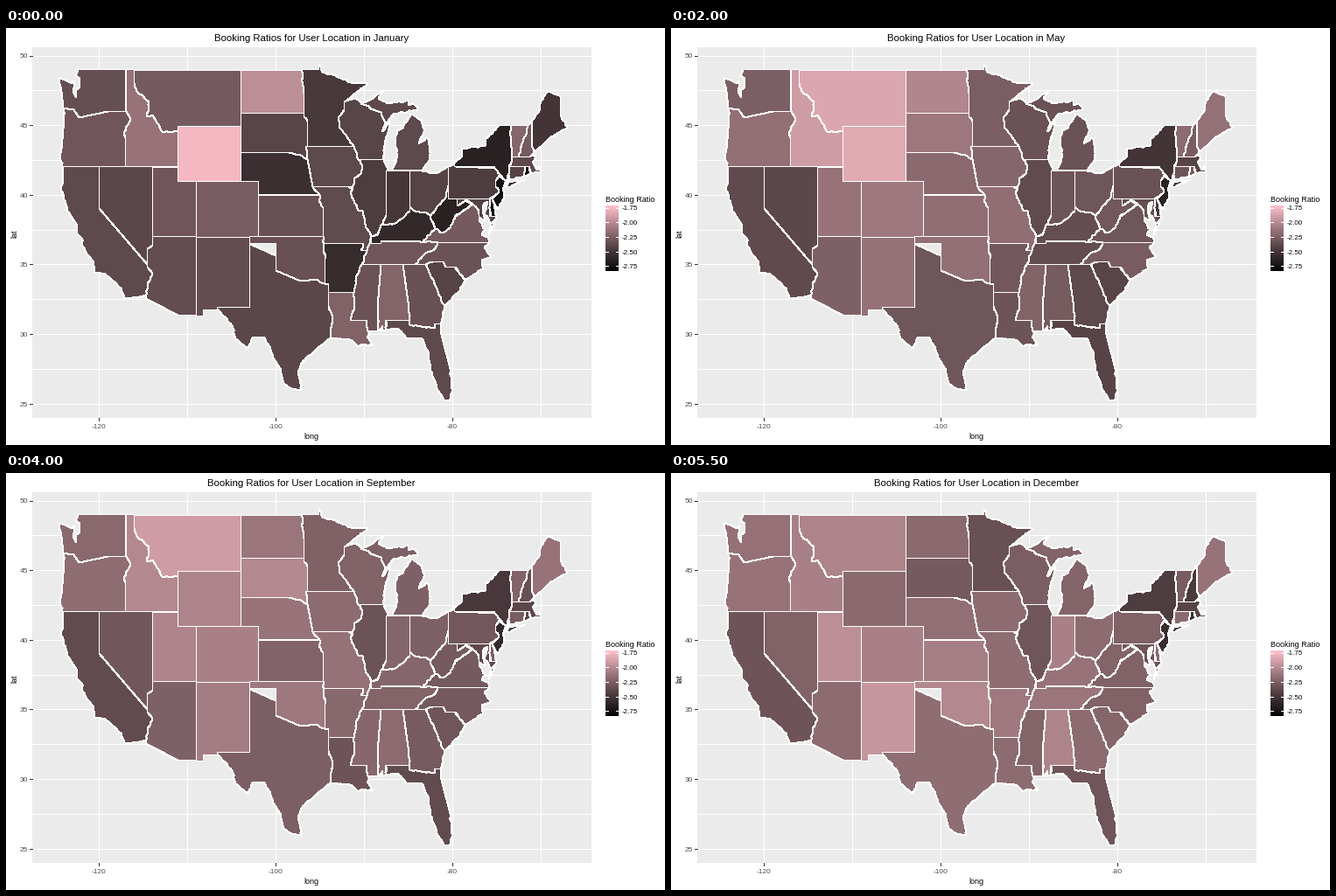
A matplotlib script for the animation above (6 s loop, 753 px wide and 477 px high).

```python
import math
import random

import matplotlib.pyplot as plt
import numpy as np
from matplotlib.animation import FuncAnimation
from matplotlib.patches import Polygon, Rectangle

WIDTH, HEIGHT = 753, 477
MONTHS = ["January", "February", "March", "April", "May", "June", "July",
          "August", "September", "October", "November", "December"]
# A state's shade runs through four seasons, at these month numbers.
SEASONS = [0, 3, 6.5, 10]

plt.rcParams["font.family"] = "Liberation Sans"
fig = plt.figure(figsize=(WIDTH / 72, HEIGHT / 72), dpi=72, facecolor="white")
ax = fig.add_axes([0, 0, 1, 1])
ax.axis("off")


def pink(t):
    """Black to pink, evenly spaced in CIE Lab."""
    light, a, b = 83.59 * t, 24.14 * t, 3.33 * t
    fy = (light + 16) / 116
    f = np.array([fy + a / 500, fy, fy - b / 200])
    xyz = np.where(f > 6 / 29, f ** 3, 3 * (6 / 29) ** 2 * (f - 4 / 29))
    xyz = xyz * [0.9505, 1, 1.089]
    rgb = np.array([[3.2406, -1.5372, -0.4986],
                    [-0.9689, 1.8758, 0.0415],
                    [0.0557, -0.2040, 1.0570]]) @ xyz
    rgb = np.clip(rgb, 0, 1)
    return np.where(rgb > 0.0031308, 1.055 * rgb ** (1 / 2.4) - 0.055, 12.92 * rgb)


def shade(month, seasons):
    t = np.interp(month, SEASONS, seasons) / 100
    return pink(t + 0.3 * t * (1 - t))


def wiggle(p, q):
    """Inner points of a ragged border; long or square borders stay straight."""
    dx, dy = q[0] - p[0], q[1] - p[1]
    length = math.hypot(dx, dy)
    if min(abs(dx), abs(dy)) < 1 or length > 30:
        return []
    n = max(1, int(length // 3))
    rng = random.Random(p[0] * 7919 + p[1] * 613 + q[0] * 31 + q[1])
    return [(p[0] + dx * k / n + rng.uniform(-0.8, 0.8),
             p[1] + dy * k / n + rng.uniform(-0.8, 0.8)) for k in range(1, n)]


def outline(flat):
    points = list(zip(flat[::2], flat[1::2]))
    path = []
    for p, q in zip(points, points[1:] + points[:1]):
        path += [p] + wiggle(p, q)
    return np.array(path) + 0.5


def box(x0, y0, x1, y1):
    return [x0, y0, x1, y0, x1, y1, x0, y1]


def line(x, y, color="white", width=1):
    ax.plot(x, y, color=color, lw=width, antialiased=False, zorder=1,
            solid_capstyle="butt")


def label(x, y, text, size, color="black", **kw):
    return ax.text(x, y, text, fontsize=size, color=color, **kw)


# Panel, grid and axes
ax.add_patch(Rectangle((30, 22), 639.5, 424, fc="#EBEBEB", lw=0, zorder=0))
for lon in range(-120, -60, 10):
    x = 308.5 + 10.1 * (lon + 100)
    line([x, x], [22, 446])
    if lon % 20 == 0:
        line([x, x], [446, 449], "#333333")
        label(x - 0.5, 458.5, str(lon), 8.2, "#4D4D4D", ha="center")
for step in range(11):
    y = 31.5 + 39.82 * step
    line([30, 669], [y, y])
    if step % 2 == 0:
        line([27, 30], [y, y], "#333333")
        label(25, y + 3, str(50 - step * 5 // 2), 8.4, "#4D4D4D", ha="right")
label(349, 470.5, "long", 9, ha="center")
label(10, 235, "lat", 9, rotation=90, ha="center", va="center")
title = label(349, 15, "", 11.4, ha="center")

# Legend
label(685, 199, "Booking Ratio", 9)
ramp = np.array([[pink(t)] for t in np.linspace(1, 0, 75)])
ax.imshow(ramp, extent=(685, 700, 278, 203), aspect="auto", zorder=1)
ax.set(xlim=(0, WIDTH), ylim=(HEIGHT, 0))
for k in range(5):
    y = 205.5 + 16.7 * k
    line([685, 688], [y, y])
    line([697, 700], [y, y])
    label(704, y + 3, f"{-1.75 - 0.25 * k:.2f}", 8)

regions = []


def state(seasons, *outlines):
    """Add a state on top of the earlier ones, whose hidden edges stay rough."""
    for flat in outlines:
        patch = Polygon(outline(flat), closed=True, ec="white", lw=1,
                        antialiased=False, zorder=2, joinstyle="round")
        ax.add_patch(patch)
        regions.append((patch, seasons))


# Montana, Idaho, Oregon, Washington
state((42, 82, 88, 64), box(140, 47, 268, 119))
state((55, 81, 69, 62),
      [136, 47, 146, 47, 146, 63, 149, 72, 163, 84, 161, 101, 167, 99, 179, 119,
       196, 117, 196, 158, 136, 158, 132, 120, 136, 95])
state((40, 54, 49, 55),
      [65, 91, 66, 103, 63, 137, 61, 145, 64, 158, 136, 158, 136, 125, 134, 120,
       142, 104, 137, 95, 80, 88])
state((36, 44, 46, 54),
      [60, 57, 75, 63, 77, 60, 76, 72, 80, 79, 80, 70, 83, 68, 84, 57, 79, 54,
       82, 47, 136, 47, 137, 95, 116, 95, 83, 102, 77, 93, 65, 91, 64, 78])
# California, Nevada, Utah, Arizona, New Mexico
state((33, 35, 31, 39),
      [64, 158, 150, 158, 161, 268, 168, 281, 160, 306, 135, 309, 131, 297,
       121, 288, 113, 281, 101, 279, 100, 268, 87, 249, 86, 240, 81, 235,
       81, 226, 75, 216, 69, 208, 68, 198, 62, 184, 65, 174])
state((32, 31, 36, 46),
      [106, 158, 167, 158, 167, 248, 161, 252, 161, 270, 106, 206])
state((40, 53, 60, 70), box(167, 158, 217, 238))
state((35, 47, 41, 51),
      [167, 238, 217, 238, 217, 328, 196, 328, 159, 309, 161, 294, 167, 281,
       161, 273, 161, 252, 167, 248])
# Dakotas, Nebraska, Kansas, Colorado, Wyoming
state((70, 67, 61, 50), box(268, 47, 345, 96))
state((31, 46, 84, 42), box(268, 96, 346, 150))
state((20, 47, 57, 53),
      [268, 142, 323, 142, 336, 145, 344, 150, 358, 190, 268, 190])
state((37, 59, 36, 61), box(288, 190, 362, 238))
state((43, 56, 62, 62), box(217, 174, 288, 238))
state((95, 90, 75, 50), box(196, 111, 268, 174))
# Minnesota, Iowa, Missouri
state((25, 41, 52, 37),
      [337, 47, 357, 47, 357, 41, 361, 50, 376, 54, 394, 62, 413, 63, 395, 77,
       388, 83, 392, 118, 397, 135, 344, 135, 344, 106, 340, 101, 340, 74])
state((33, 47, 51, 51),
      [342, 135, 399, 135, 412, 158, 400, 181, 350, 181, 344, 150])
state((34, 51, 56, 52),
      [350, 181, 391, 181, 395, 184, 410, 205, 418, 234, 414, 254, 405, 254,
       408, 246, 362, 246, 362, 205, 357, 197, 359, 193])
# Texas, New Mexico, Oklahoma, Arkansas, Louisiana
state((32, 40, 39, 52),
      [270, 243, 364, 285, 368, 293, 374, 320, 370, 354, 356, 365, 337, 383,
       333, 393, 337, 414, 326, 412, 317, 406, 313, 389, 305, 377, 301, 364,
       294, 353, 281, 354, 276, 366, 262, 355, 258, 340, 241, 321, 241, 310])
state((35, 56, 50, 74),
      [217, 238, 278, 238, 278, 318, 241, 318, 241, 321, 225, 321, 225, 328,
       217, 328])
state((37, 54, 51, 66),
      [278, 238, 362, 238, 364, 263, 364, 292, 353, 287, 336, 289, 308, 277,
       308, 246, 278, 246])
state((18, 40, 42, 58),
      [362, 246, 408, 246, 405, 254, 414, 254, 410, 270, 402, 302, 368, 302,
       368, 293, 364, 292, 364, 263])
state((46, 42, 30, 51),
      [368, 302, 402, 302, 402, 330, 416, 334, 413, 346, 415, 349, 412, 353,
       419, 363, 408, 361, 401, 364, 395, 357, 370, 354, 373, 330, 368, 318])
# Florida, Mississippi, Alabama, Georgia
state((33, 31, 30, 40),
      [433, 330, 490, 335, 496, 338, 497, 350, 507, 389, 509, 416, 506, 426,
       500, 425, 492, 412, 484, 389, 483, 372, 474, 354, 458, 355, 446, 343,
       434, 345])
state((38, 45, 50, 47),
      [406, 270, 430, 270, 427, 346, 413, 346, 411, 334, 393, 334, 398, 316,
       397, 302, 400, 283])
state((47, 43, 40, 64),
      [428, 270, 455, 270, 461, 334, 433, 334, 434, 345, 429, 346, 430, 340,
       425, 346, 424, 319])
state((37, 32, 36, 51),
      [453, 270, 484, 270, 500, 305, 501, 317, 496, 338, 490, 338, 489, 343,
       461, 339, 459, 313])
# South Carolina, Virginia, Illinois, Indiana
state((30, 30, 34, 48),
      [479, 270, 490, 262, 505, 264, 524, 288, 518, 300, 501, 317, 498, 314,
       490, 294])
state((42, 40, 39, 46),
      [473, 246, 552, 245, 550, 239, 543, 236, 547, 230, 541, 221, 540, 209,
       533, 201, 495, 228, 485, 232],
      [554, 223, 558, 222, 551, 236])
state((27, 33, 37, 40),
      [402, 150, 431, 150, 436, 163, 436, 220, 430, 232, 417, 238, 410, 224,
       407, 209, 402, 208, 394, 190, 398, 171, 405, 166, 407, 158])
state((24, 40, 37, 62),
      [434, 163, 463, 163, 463, 212, 440, 230, 428, 226, 434, 214, 434, 200])
# Pennsylvania, Ohio, Kentucky, Tennessee, North Carolina, West Virginia
state((27, 38, 37, 46),
      [505, 158, 512, 154, 514, 158, 563, 160, 566, 186, 552, 195, 505, 195])
state((30, 39, 41, 51),
      [461, 163, 475, 163, 490, 166, 505, 158, 505, 190, 488, 216, 461, 212])
state((17, 33, 43, 55),
      [417, 238, 416, 247, 473, 246, 490, 229, 487, 215, 480, 211, 467, 209,
       461, 204, 461, 209, 453, 217, 444, 223, 428, 225, 424, 236])
state((40, 33, 40, 56),
      [406, 270, 467, 270, 486, 258, 493, 245, 473, 244, 428, 243, 428, 246,
       415, 246])
state((38, 45, 38, 46),
      [467, 270, 478, 258, 490, 252, 493, 245, 552, 245, 546, 250, 554, 261,
       543, 265, 545, 274, 524, 288, 513, 273, 502, 273, 499, 267, 487, 267,
       479, 270])
state((13, 42, 38, 47),
      [490, 229, 484, 216, 493, 203, 501, 195, 505, 180, 505, 195, 515, 195,
       533, 201, 521, 209, 513, 214, 507, 228, 498, 234])
# Wisconsin and Michigan
state((31, 34, 48, 44),
      [386, 84, 399, 80, 405, 85, 432, 97, 433, 109, 429, 118, 439, 106,
       432, 131, 431, 150, 402, 150, 397, 135, 381, 114, 380, 101, 386, 93])
state((33, 35, 44, 47),
      [441, 162, 475, 163, 484, 149, 483, 128, 480, 125, 471, 132, 477, 118,
       475, 106, 462, 98, 453, 114, 447, 117, 444, 126, 447, 146],
      [405, 86, 417, 81, 431, 71, 425, 80, 435, 86, 459, 83, 459, 88, 466, 87,
       470, 93, 442, 98, 433, 109, 428, 96])
# New York, New Jersey, Maryland, Delaware
state((13, 23, 23, 27),
      [512, 154, 521, 146, 520, 138, 547, 134, 548, 126, 563, 111, 579, 111,
       579, 150, 571, 178, 557, 158, 512, 158],
      [570, 181, 574, 176, 592, 173, 576, 181])
state((5, 13, 17, 19),
      [555, 195, 563, 187, 559, 181, 559, 174, 563, 168, 571, 174, 568, 182,
       569, 194, 561, 207])
state((30, 38, 30, 39),
      [515, 195, 552, 195, 553, 215, 560, 215, 554, 223, 547, 213, 549, 198,
       544, 203, 547, 220, 540, 216, 540, 209, 533, 201, 526, 196, 515, 203])
state((3, 18, 40, 50), [552, 195, 555, 193, 560, 215, 553, 215])
# New England
state((30, 39, 38, 50), [575, 156, 593, 156, 592, 169, 574, 174])
state((5, 40, 42, 20), [593, 156, 597, 156, 599, 166, 592, 169])
state((48, 51, 50, 43),
      [577, 111, 597, 111, 590, 147, 578, 147, 576, 123])
state((42, 43, 45, 26),
      [596, 111, 601, 105, 603, 142, 598, 147, 586, 147, 587, 138, 595, 118])
state((33, 30, 33, 31),
      [578, 147, 598, 147, 602, 144, 605, 148, 601, 153, 606, 162, 610, 162,
       608, 157, 611, 164, 600, 166, 597, 158, 575, 158])
state((23, 53, 55, 55),
      [600, 106, 608, 96, 611, 83, 619, 72, 633, 78, 633, 99, 641, 113, 620, 126,
       604, 141, 601, 136])


def update(month):
    title.set_text(f"Booking Ratios for User Location in {MONTHS[month]}")
    for patch, seasons in regions:
        patch.set_facecolor(shade(month, seasons))
    return [title] + [patch for patch, _ in regions]


anim = FuncAnimation(fig, update, frames=len(MONTHS), interval=500, repeat=True,
                     repeat_delay=0, blit=False)
plt.show()
```
